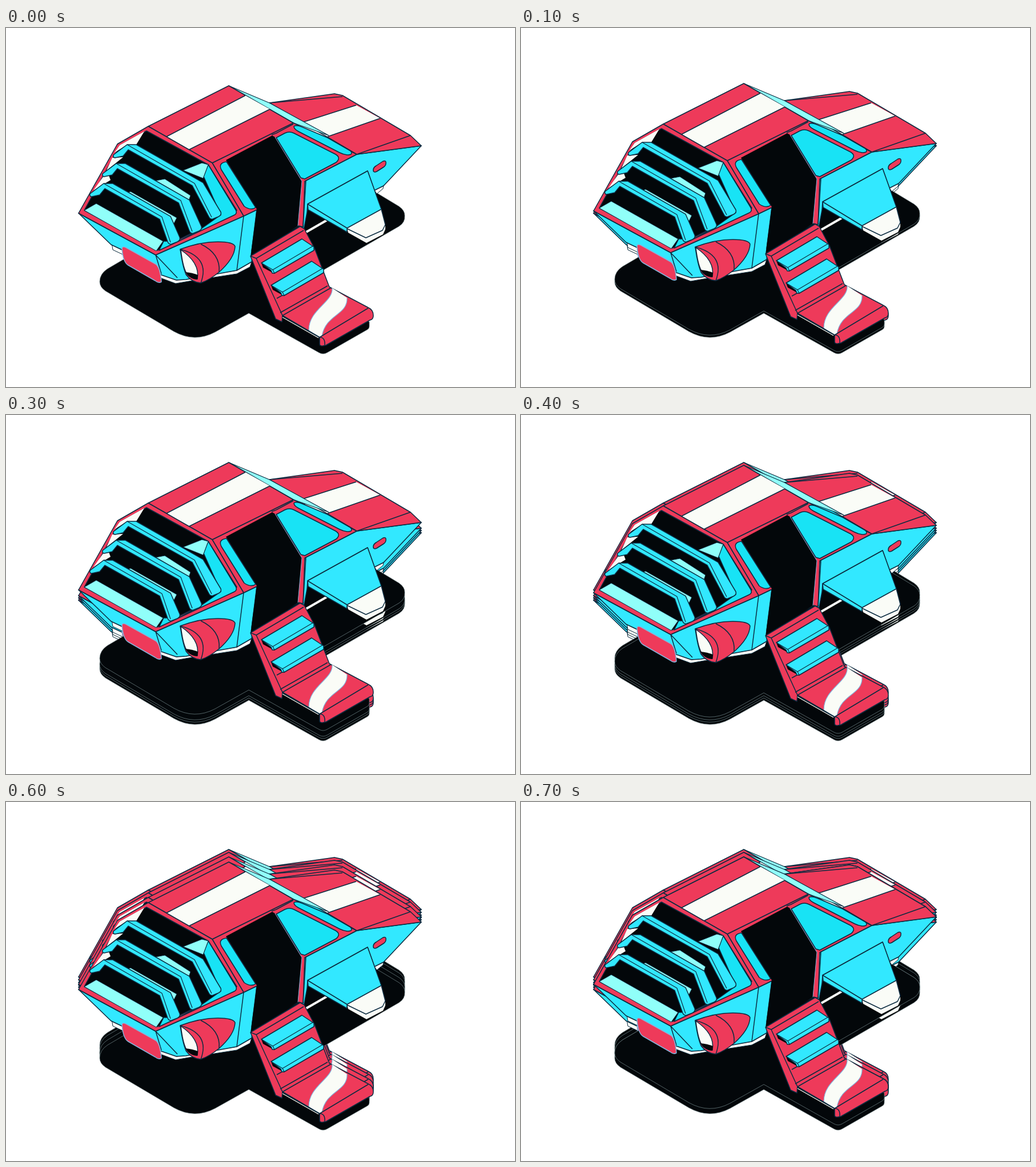
Write an HTML page with a canvas that moves like this. It is 891x628 px and loops after 800 ms.

```html
<!DOCTYPE html>
<html lang="en">
<head>
<meta charset="utf-8">
<title>Hovering ship</title>
<style>
  html, body { margin: 0; width: 100%; height: 100%; overflow: hidden; background: #fff; }
  canvas { display: block; }
</style>
</head>
<body>
<canvas id="stage" width="891" height="628"></canvas>
<script>
const ctx = document.getElementById('stage').getContext('2d');
const RED = '#ee3a5a', CYAN = '#32e8ff', GLASS = '#18e3f5', PALE = '#90fff9';
const WHITE = '#fafcf7', BLACK = '#03070a', LINE = '#0b2b40', RIM = '#86b4dc';
const STEP = 100;
const lift = [0, -4, -8, -18, -13, -5, 4, -5];
const parts = [];

const shape = (fill, d, line = LINE, width = 1.5) =>
  parts.push({ path: new Path2D(d + 'Z'), fill, line, width });
const flat = (fill, d) => shape(fill, d, null);
const stroke = (d, line = LINE, width = 1.5) =>
  parts.push({ path: new Path2D(d), line, width });

function shadow() {
  shape(BLACK, 'M207 404L178 421Q164 430 164 444Q164 453 174 460L294 531Q330 551 366 532L425 499L548 568Q555 572 562 568L632 528Q636 526 636 522V514L560 470L546 429L688 347Q699 340 698 328Q698 319 688 312L640 283L400 300Z', '#75898b', .7);
  stroke('M522 359L562 336', WHITE, 4);
}

function rear() {
  shape(WHITE, 'M645 284L661 275L660 281L649 290', LINE, 1);
  shape(CYAN, 'M523 268L614 221L727 206L661 276L645 284L633 250L528 308L527 322L521 354L512 345');
  shape(RED, 'M461 131L575 115L589 118L708 188L727 206L614 221L519 165');
  flat(WHITE, 'M519 165L613 135L655 158L563 190');
  stroke('M519 165L613 135M655 158L563 190M461 131L589 120M708 188L614 221');
  shape(PALE, 'M390 101L461 131L565 188L503 166', LINE, 1.2);
  shape(RED, 'M643 247Q644 243 648 241L660 233Q666 231 665 237Q665 241 660 244L649 251Q642 254 643 247');
}

function wing() {
  flat(WHITE, 'M597 350L657 317L664 343V352L660 361L631 376L599 358');
  stroke('M657 317L664 344L659 354L630 367L597 351');
  shape(CYAN, 'M528 308L633 250L657 317L597 350V357L529 318');
  stroke('M528 308L597 350');
}

function hull() {
  shape(WHITE, 'M185 376L204 388L275 430L299 441L404 424L430 409L427 418L404 430L320 443L297 447L270 437L204 396L187 388', LINE, 1);
  shape(CYAN, 'M127 324L262 397L416 329L439 318L430 409L404 424L315 440L298 441L272 432L203 388L184 379');
  stroke('M416 329L404 424M262 397L300 437M262 397L272 430M305 387L316 433');
}

function cabin() {
  shape(RED, 'M361 236L503 166L614 221L523 268L520 348L512 346L430 390L439 318L416 329');
  flat(BLACK, 'M385 231L466 188L471 191L518 268L511 346L428 400L439 317');
  stroke('M471 191L518 268L511 346', RIM, 1);
  stroke('M525 267L520 348');
  shape(GLASS, 'M473 192L488 184Q496 180 504 184L577 221Q587 227 578 235L523 264L516 262');
  shape(GLASS, 'M504 172Q508 169 518 173L563 192L603 215Q609 222 597 222Q590 221 584 218L512 181Q504 177 504 172');
  shape(GLASS, 'M377 248Q371 236 386 234L437 314Q429 320 417 312');
  shape(RED, 'M249 172L390 101L503 166L361 236');
  flat(WHITE, 'M281 190L419 118L462 142L320 213');
  stroke('M281 190L419 118M462 142L320 213M465 187L473 184L503 168');
}

// One bent louvre: tip on the left, knee after the long run, foot on the right.
function louvre(x, y, run, fx, fy) {
  const kx = x + 40 + run, ky = y - 18 + run * .57;
  shape(CYAN, `M${x} ${y}L${x + 24} ${y - 18}h16L${kx} ${ky}L${fx} ${fy - 3}
    q2 5 -4 8l-10 4q-5 1 -7 -4L${kx - 19} ${ky + 5}L${x + 26} ${y - 9}l-9 11l-14 3q-4 0 -3 -5`);
  stroke(`M${x + 24} ${y - 18}L${kx - 15} ${ky + 1}L${fx - 16} ${fy + 6}`, LINE, 1.2);
}

function grille() {
  shape(RED, 'M195 203L249 172L361 236L416 329L262 397L127 324');
  shape(BLACK, 'M199 206L246 180L354 239L404 319L265 389L137 319');
  flat(WHITE, 'M199 205L242 181L228 204L212 204L190 218Z M186 227L205 226L190 238L176 249Z M171 259L180 258L183 266L153 284');
  shape(GLASS, 'M354 239L402 318Q406 325 398 328L268 389L276 373L302 373L342 351L376 327L346 260');
  shape(PALE, 'M310 249L343 236L354 239L345 263', LINE, 1);
  shape(PALE, 'M262 267L278 264L323 293L320 302', LINE, 1);
  shape(PALE, 'M207 291L218 286L299 332L294 342', LINE, 1);
  shape(PALE, 'M137 319L158 307L275 373L263 390', LINE, 1);
  louvre(188, 222, 117, 376, 325);
  louvre(169, 255, 112, 342, 350);
  louvre(147, 290, 101, 304, 369);
}

function intake() {
  shape(RED, 'M305 387Q340 374 371 374Q398 374 401 382Q400 403 373 427Q356 441 341 446Q325 445 315 431Q309 417 305 387');
  shape(WHITE, 'M306 388Q310 422 318 432Q327 440 335 439Q340 411 306 388');
  flat(BLACK, 'M314 427Q326 428 336 432L335 440Q323 440 314 427');
  stroke('M305 387Q358 401 341 446M341 378Q376 395 373 427');
  shape(RED, 'M203 386Q203 381 210 384L262 413Q270 418 272 444Q267 447 261 442L214 415Q205 410 203 386', RIM);
}

function step(x, y) {
  flat(BLACK, `M${x} ${y}l3 8l20 11l2 -8`);
  shape(CYAN, `M${x} ${y}l71 -42l21 14v6l-69 40h-4l-2 -5`);
  stroke(`M${x} ${y}l20 12l3 6m-3 -6l71 -42`, LINE, 1.2);
}

function ramp() {
  shape(RED, 'M428 399L515 347L522 351L540 385L566 453L634 489Q643 493 643 503Q643 510 637 511L560 555Q549 558 549 553V541L484 503L483 514L472 509');
  flat(WHITE, 'M571 455L597 472C598 503 560 500 553 539L548 541L530 529C530 492 573 480 571 455');
  stroke('M571 455C573 480 530 492 530 529M597 472C598 503 560 500 553 539', RIM, 1.2);
  stroke('M428 399L438 403L484 503L568 455M438 403L521 354M474 473L552 430M480 498L563 451M484 503L549 541L634 490M549 541Q559 541 558 555');
  stroke('M484 506L547 542', WHITE, 1.3);
  step(447, 411);
  step(464, 450);
}

[shadow, rear, wing, hull, cabin, grille, intake, ramp].forEach(build => build());
ctx.lineJoin = 'round';

function drawShip(y) {
  ctx.setTransform(1, 0, 0, 1, 0, y);
  for (const { path, fill, line, width } of parts) {
    if (fill) {
      ctx.fillStyle = fill;
      ctx.fill(path);
    }
    if (line) {
      ctx.strokeStyle = line;
      ctx.lineWidth = width;
      ctx.stroke(path);
    }
  }
}

// Every pose stays on the stage until the loop restarts.
function render(pose) {
  ctx.setTransform(1, 0, 0, 1, 0, 0);
  ctx.fillStyle = '#fff';
  ctx.fillRect(0, 0, 891, 628);
  lift.slice(0, pose + 1).forEach(drawShip);
}

const start = performance.now();
let shown = -1;
function tick() {
  const pose = Math.floor((performance.now() - start) / STEP) % lift.length;
  if (pose !== shown) render(shown = pose);
  requestAnimationFrame(tick);
}
tick();
</script>
</body>
</html>
```
